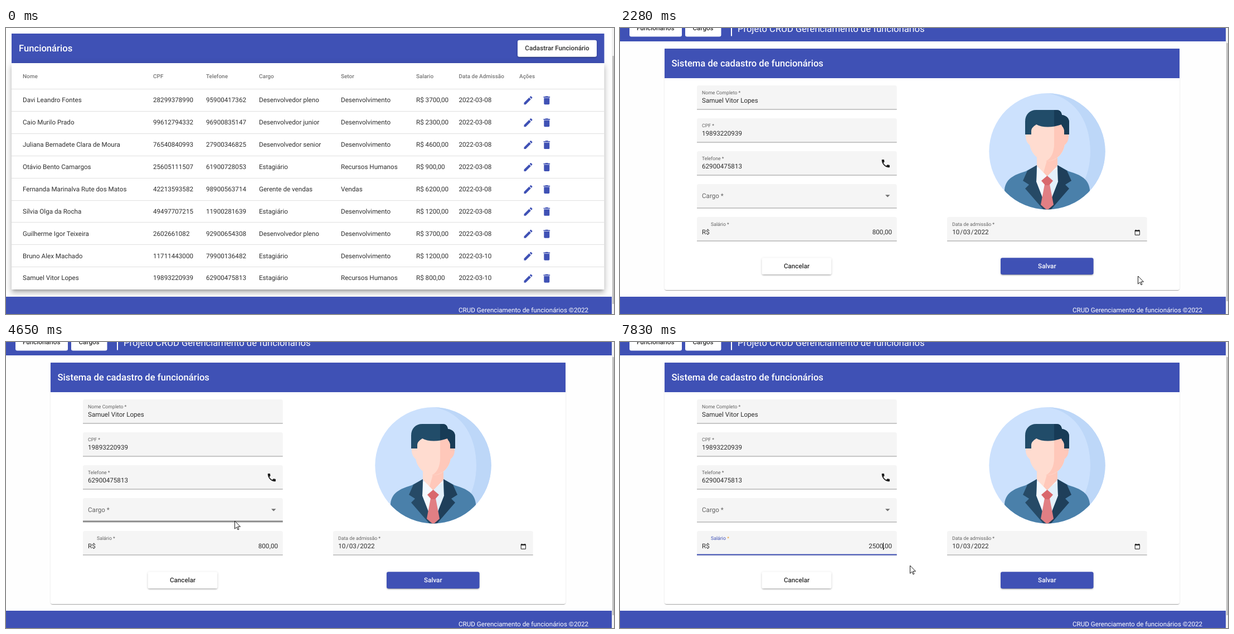
Write an HTML page with a canvas that moves like this. It is 1091x513 px and loops after 8000 ms.

```html
<!DOCTYPE html>
<html lang="pt-BR">
<head>
<meta charset="utf-8">
<title>Gerenciamento de funcionários</title>
<style>
html, body { margin: 0; width: 100%; height: 100%; overflow: hidden; background: #fff; }
canvas { display: block; }
</style>
</head>
<body>
<canvas id="stage" width="1091" height="513"></canvas>
<script>
const ctx = document.getElementById('stage').getContext('2d');
const LOOP = 8000, STEP = 70;
const INDIGO = '#3f51b5', INK = 'rgba(0,0,0,.82)', MUTED = 'rgba(0,0,0,.6)';
const BODY = 11.65, SMALL = 8.74, HEAD = 9.98, TITLE = 16.64;

const columns = [[30, 'Nome'], [264, 'CPF'], [359, 'Telefone'], [454, 'Cargo'], [601, 'Setor'],
  [736, 'Salario'], [812.5, 'Data de Admissão'], [921, 'Ações']];
const DEV = 'Desenvolvimento', HR = 'Recursos Humanos';
const people = [
  ['Davi Leandro Fontes', '28299378990', '95900417362', 'Desenvolvedor pleno', DEV, '3700', '08'],
  ['Caio Murilo Prado', '99612794332', '96900835147', 'Desenvolvedor junior', DEV, '2300', '08'],
  ['Juliana Bernadete Clara de Moura', '76540840993', '27900346825', 'Desenvolvedor senior', DEV, '4600', '08'],
  ['Otávio Bento Camargos', '25605111507', '61900728053', 'Estagiário', HR, '900', '08'],
  ['Fernanda Marinalva Rute dos Matos', '42213593582', '98900563714', 'Gerente de vendas', 'Vendas', '6200', '08'],
  ['Sílvia Olga da Rocha', '49497707215', '11900281639', 'Estagiário', DEV, '1200', '08'],
  ['Guilherme Igor Teixeira', '2602661082', '92900654308', 'Desenvolvedor pleno', DEV, '3700', '08'],
  ['Bruno Alex Machado', '11711443000', '79900136482', 'Estagiário', DEV, '1200', '10'],
  ['Samuel Vitor Lopes', '19893220939', '62900475813', 'Estagiário', HR, '800', '10']
];

const icons = {
  edit: new Path2D('M3 17.25V21h3.75L17.81 9.94l-3.75-3.75L3 17.25zM20.71 7.04c.39-.39.39-1.02 0-1.41l-2.34-2.34c-.39-.39-1.02-.39-1.41 0l-1.83 1.83 3.75 3.75 1.83-1.83z'),
  trash: new Path2D('M6 19c0 1.1.9 2 2 2h8c1.1 0 2-.9 2-2V7H6v12zM19 4h-3.5l-1-1h-5l-1 1H5v2h14V4z'),
  phone: new Path2D('M6.62 10.79c1.44 2.83 3.76 5.14 6.59 6.59l2.2-2.2c.27-.27.67-.36 1.02-.24 1.12.37 2.33.57 3.57.57.55 0 1 .45 1 1V20c0 .55-.45 1-1 1-9.39 0-17-7.61-17-17 0-.55.45-1 1-1h3.5c.55 0 1 .45 1 1 0 1.25.2 2.45.57 3.57.11.35.03.74-.25 1.02l-2.2 2.2z'),
  calendar: new Path2D('M20 3h-1V1h-2v2H7V1H5v2H4c-1.1 0-2 .9-2 2v16c0 1.1.9 2 2 2h16c1.1 0 2-.9 2-2V5c0-1.1-.9-2-2-2zm0 18H4V8h16v13z'),
  arrow: new Path2D('M0 0V17L4 13.2 6.6 19 9 18 6.4 12.3H12Z')
};

// Pointer moves: start, step count, way points
const moves = [
  [370, 6, [1047, 484], [965, 427], [935, 412], [922, 420]],
  [920, 10, [918, 428], [927, 446], [930, 451]],
  [1810, 6, [930, 451], [931, 448]],
  [2280, 5, [929, 445], [925, 442], [895, 419]],
  [2630, 12, [893, 417], [600, 290], [300, 153], [270, 176], [263, 199]],
  [4090, 12, [270, 205], [463, 365]],
  [4990, 4, [470, 369], [520, 401]]
];
const hovers = [[1, 3330, 4150], [2, 4190, 4400], [3, 4470, 4670], [4, 4760, 4990]];
const typed = [[0, '800'], [5710, '80'], [5910, '8'], [6390, ''], [7280, '2'], [7490, '25'], [7630, '250'], [7830, '2500']];

const clamp = v => Math.max(0, Math.min(1, v));
const ramp = (t, from, to) => clamp((t - from) / (to - from));
const lerp = (a, b, k) => a + (b - a) * k;

function rect(x, y, w, h, color) {
  ctx.fillStyle = color;
  ctx.fillRect(x, y, w, h);
}

function round(x, y, w, h, r, color) {
  ctx.beginPath();
  ctx.roundRect(x, y, w, h, r);
  ctx.fillStyle = color;
  ctx.fill();
}

function text(str, x, y, size = BODY, color = INK, weight = 400, align = 'left') {
  ctx.font = `${weight} ${size}px Roboto, sans-serif`;
  ctx.textAlign = align;
  ctx.fillStyle = color;
  ctx.fillText(str, x, Math.floor(y));
}

// Each layer: y offset, blur, spread, alpha
function shadow(x, y, w, h, layers, k = 1) {
  const far = 3000;
  for (const [dy, blur, grow, alpha] of layers) {
    ctx.save();
    ctx.shadowColor = `rgba(0,0,0,${alpha * k})`;
    ctx.shadowBlur = blur;
    ctx.shadowOffsetX = far;
    ctx.shadowOffsetY = dy;
    round(x - grow - far, y - grow, w + 2 * grow, h + 2 * grow, 3, '#000');
    ctx.restore();
  }
}
const HIGH = [[4.2, 4.2, -2.5, .2], [6.7, 8.3, .8, .14], [2.5, 11.6, 1.7, .12]];
const CARD = [[1.7, .8, -.8, .2], [.8, .8, 0, .14], [.8, 2.5, 0, .12]];
const RAISED = [[2.5, .8, -1.7, .2], [1.7, 1.7, 0, .14], [.8, 4.2, 0, .12]];

function icon(path, cx, cy, size, color) {
  ctx.save();
  ctx.translate(cx - size / 2, cy - size / 2);
  ctx.scale(size / 24, size / 24);
  ctx.fillStyle = color;
  ctx.fill(path);
  ctx.restore();
}

function shape(d, color) {
  ctx.fillStyle = color;
  ctx.fill(new Path2D(d));
}

function button(x, y, w, h, label, bg = '#fff', color = INK, lift = 1) {
  shadow(x, y, w, h, RAISED, lift);
  round(x, y, w, h, 3.3, bg);
  text(label, x + w / 2, y + h / 2 + 4, BODY, color, 500, 'center');
}

function frame(thumbTop, thumbEnd) {
  rect(0, 482, 1087, 31, INDIGO);
  text('CRUD Gerenciamento de funcionários ©2022', 812, 510, BODY, '#fff');
  rect(1087, 0, 4, 513, '#f1f1f1');
  rect(1088, thumbTop, 3, thumbEnd - thumbTop, '#c1c1c1');
}

function listPage() {
  // The table's shadow also falls on the toolbar above it
  rect(10, 10, 1063.5, 53, INDIGO);
  shadow(10, 63, 1063.5, 406, HIGH);
  rect(10, 63, 1063.5, 406, '#fff');
  text('Funcionários', 23, 42, TITLE, '#fff', 500);
  button(918, 21.7, 142, 30, 'Cadastrar Funcionário');
  for (const [x, label] of columns) text(label, x, 90, HEAD, 'rgba(0,0,0,.54)', 500);
  people.forEach((p, i) => {
    const mid = 129 + 39.93 * i, base = Math.round(mid + 4);
    rect(10, Math.round(109 + 39.9 * i), 1063.5, 1, '#e0e0e0');
    const cells = [...p.slice(0, 5), `R$ ${p[5]},00`, `2022-03-${p[6]}`];
    cells.forEach((c, n) => text(c, columns[n][0], base));
    icon(icons.edit, 937, mid + .7, 20, INDIGO);
    icon(icons.trash, 970.3, mid + .7, 20, INDIGO);
  });
  frame(50, 495);
}

function portrait() {
  ctx.save();
  ctx.beginPath();
  ctx.arc(766.5, 221.3, 104.2, 0, 7);
  ctx.clip();
  rect(660, 115, 213, 213, '#cce1fd');
  shape('M766 117C818 124 844 170 844 221S818 318 766 326H875V115Z', '#bdd7f8');
  // Neck and shirt
  shape('M745 250H788L792 326H741Z', '#f5f9ff');
  shape('M767 262L788 250 790 300 767 326Z', '#e4f0fb');
  shape('M748 222H785V247L766.5 266 748 247Z', '#ffdcd0');
  shape('M766 238L785 222V247L766.5 266 760 259Z', '#ffc8ba');
  // Jacket
  shape('M690 330V290C692 268 712 262 728 257L748 246 747 276 766.5 326 786 276 785 246 805 257C821 262 841 268 843 290V330Z', '#4a80aa');
  shape('M731 256L748 246 747 276 766.5 326H760L727 288 734 281 723 274Z', '#264a66');
  shape('M802 256L785 246 786 276 766.5 326H773L806 288 799 281 810 274Z', '#1f3f5a');
  // Tie
  shape('M762 280H771L778 317 766.5 327 755 317Z', '#e17f84');
  shape('M756 274L766.5 265 777 274 770 282H763Z', '#d9686d');
  // Head
  shape('M728 190H737V211C731 208 727 200 728 190Z', '#ffdcd0');
  shape('M805 190H796V211C802 208 806 200 805 190Z', '#ffc8ba');
  shape('M735 168H798V205C798 224 783 239 767 239S735 224 735 205Z', '#ffdcd0');
  shape('M779 168H798V205C798 224 783 239 764 239C774 234 779 222 779 208Z', '#ffc8ba');
  shape('M727 191V168C727 155 735 147 747 147H783C789 147 792 150 793 156C801 157 806 162 806 169V191H797V184C797 179 794 178 792 173C776 179 758 179 747 173C743 176 738 179 738 185V191Z', '#214c69');
  shape('M779 147H783C789 147 792 150 793 156C801 157 806 162 806 169V191H797V184C797 179 794 178 792 173L779 176Z', '#173b56');
  ctx.restore();
}

function field(x, y, label, labelX = x + 9) {
  round(x, y, 358.7, 43, [3.3, 3.3, 0, 0], '#f5f5f5');
  rect(x, y + 42.5, 358.7, 1, '#949494');
  if (label) text(label, labelX, y + 16, SMALL, MUTED);
}

function salary(t) {
  const focused = t >= 4990;
  field(138, 339, focused ? '' : 'Salário *', 163);
  if (focused) {
    text('Salário', 163, 355, SMALL, INDIGO);
    text('*', 192.3, 355, SMALL, '#e8a23c');
    const w = 358.7 * lerp(.5, 1, ramp(t, 4960, 5190));
    rect(138 + (358.7 - w) / 2, 380.5, w, 2, INDIGO);
  }
  text('R$', 147, 370);
  const value = typed.filter(s => t >= s[0]).pop()[1];
  text(value || '0', 472.4, 370, BODY, value ? INK : 'rgba(0,0,0,.42)', 400, 'right');
  text(',00', 488, 370, BODY, INK, 400, 'right');
  const caret = t >= 5060 && !(t >= 7010 && t < 7280);
  if (caret) rect(t < 5400 ? 465.5 : 472, 360, 1, 13, '#000');
}

function saveButton(t) {
  const off = ramp(t, 6320, 6740) - ramp(t, 7210, 7560);
  const mix = (a, b) => 'rgb(' + a.map((v, i) => Math.round(lerp(v, b[i], off))) + ')';
  button(683, 412.3, 166.6, 30, 'Salvar', mix([63, 81, 181], [224, 224, 224]), mix([255, 255, 255], [180, 180, 180]), 1 - off);
}

function formPage(t) {
  rect(0, 0, 1087, 24, INDIGO);
  round(17, -15, 94, 30.5, 3.3, '#fff');
  round(117, -15, 64.5, 30.5, 3.3, '#fff');
  text('Funcionários', 30, 4, BODY, INK, 500);
  text('Cargos', 130.5, 4, BODY, INK, 500);
  rect(199, 0, 2, 14.5, '#fff');
  text('Projeto CRUD Gerenciamento de funcionários', 211, 7, TITLE, '#fff');

  shadow(80, 37, 924, 433, CARD);
  round(80, 37, 924, 433, 3, '#fff');
  rect(80, 37, 924, 53, INDIGO);
  text('Sistema de cadastro de funcionários', 92.5, 69, TITLE, '#fff', 500);

  const me = people[8];
  ['Nome Completo *', 'CPF *', 'Telefone *'].forEach((label, i) => {
    field(138, 103 + 59 * i, label);
    text(me[i], 147, 134 + 59 * i);
  });
  icon(icons.phone, 476.8, 243, 19, '#1c1c1c');
  field(138, 280);
  text('Cargo *', 147, 305, BODY, MUTED);
  shape('M476 299.3H484.4L480.2 303.5Z', '#707070');
  salary(t);
  for (const [i, on, off] of hovers) {
    const k = t < off ? ramp(t, on, on + 330) : 0;
    if (k) rect(138, 144.5 + 59 * i - 1, 358.7, 2, `rgba(0,0,0,${.87 * k})`);
  }

  field(587, 339, 'Data de admissão *', 596);
  [['10', 596.3], ['/', 610.2], ['03', 615.8], ['/', 629.7], ['2022', 635.3]].forEach(([s, x]) => text(s, x, 370));
  icon(icons.calendar, 928.3, 366.7, 11, '#111');

  portrait();
  button(254.5, 412.3, 125, 30, 'Cancelar');
  saveButton(t);
  frame(27, 490);
}

function pointer(t) {
  const move = moves.filter(m => t >= m[0]).pop();
  if (!move) return;
  const [start, steps, ...pts] = move;
  const k = Math.min(1, Math.floor((t - start) / STEP) / (steps - 1)) * (pts.length - 1);
  const i = Math.min(pts.length - 2, Math.floor(k));
  const [x, y] = [0, 1].map(a => Math.round(lerp(pts[i][a], pts[i + 1][a], k - i)));
  ctx.save();
  ctx.translate(x + .5, y);
  ctx.scale(.83, .83);
  ctx.fillStyle = '#fff';
  ctx.strokeStyle = '#000';
  ctx.lineWidth = 1.1;
  ctx.fill(icons.arrow);
  ctx.stroke(icons.arrow);
  ctx.restore();
}

function draw(now) {
  const t = now % LOOP;
  ctx.textRendering = 'geometricPrecision';
  rect(0, 0, 1091, 513, '#fefefe');
  if (t < 2280) listPage();
  else formPage(t);
  pointer(t);
}

let begin;
function tick(now) {
  begin ??= now;
  draw(now - begin);
  requestAnimationFrame(tick);
}
draw(0);
requestAnimationFrame(tick);
</script>
</body>
</html>
```
